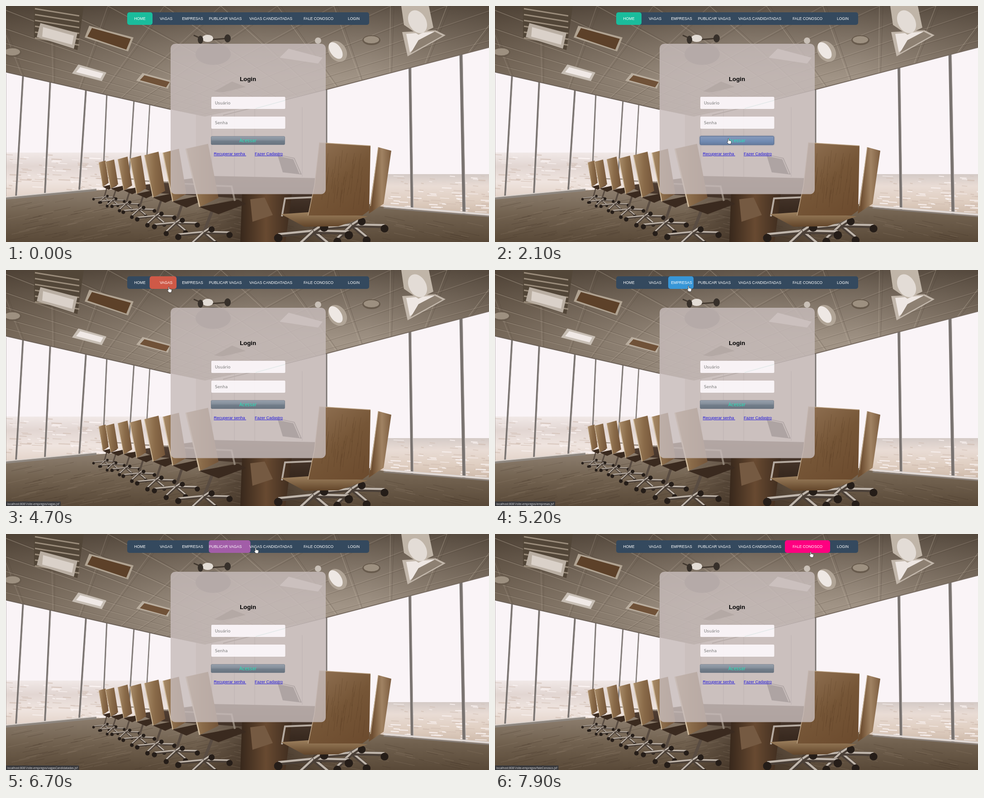
An HTML page with a canvas for the animation above (8 s loop, 1068 by 525 pixels).

```html
<!DOCTYPE html>
<html lang="pt">
<head>
<meta charset="utf-8">
<style>
  html, body { margin: 0; width: 100%; height: 100%; overflow: hidden; }
  canvas, svg { position: absolute; left: 0; top: 0; display: block; }
  text { font-family: "Liberation Sans", Arial, sans-serif; white-space: pre; }
  .nav { font-size: 8.4px; fill: #fff; text-anchor: middle; }
  .field { font: 9px "DejaVu Sans", Verdana, sans-serif; fill: #777; }
  .link { font-size: 9px; fill: #1c12dc; text-decoration: underline; }
  #status text { font: 6.35px "Open Sans", "Noto Sans", sans-serif; fill: #dfe1e5; }
</style>
</head>
<body>
<canvas id="room" width="1068" height="525"></canvas>
<svg width="1068" height="525">
  <defs>
    <linearGradient id="steel" x2="0" y2="1">
      <stop stop-color="#98a1ad"/><stop offset=".45" stop-color="#838d99"/>
      <stop offset=".55" stop-color="#727e8b"/><stop offset="1" stop-color="#69737f"/>
    </linearGradient>
    <linearGradient id="blue" x2="0" y2="1">
      <stop stop-color="#8799bb"/><stop offset=".6" stop-color="#718bb2"/><stop offset="1" stop-color="#657b9e"/>
    </linearGradient>
    <filter id="glow" x="-10%" y="-50%" width="120%" height="200%">
      <feDropShadow dx="0" dy="0" stdDeviation="1.5" flood-color="#405b85"/>
    </filter>
  </defs>
  <rect x="268" y="14" width="535" height="28" rx="5" fill="#34495e"/>
  <rect id="pill" y="14" height="28" rx="5"/>
  <g id="nav"></g>

  <rect x="364" y="84" width="343" height="334.5" rx="10" fill="#c7bcbb" fill-opacity=".82"/>
  <text x="535" y="167" font-size="13.3" font-weight="bold" text-anchor="middle">Login</text>
  <g fill="#fbf6f9" fill-opacity=".95">
    <rect x="454" y="202" width="163.500" height="27" rx="2"/>
    <rect x="454" y="246" width="163.500" height="27" rx="2"/>
  </g>
  <path d="M552 228L617 210" stroke="#cfe0dd" stroke-width=".8"/>
  <text class="field" x="462" y="219">Usuário</text>
  <text class="field" x="462" y="263">Senha</text>
  <rect x="453.500" y="290" width="163" height="18.500" rx="2" fill="url(#steel)" stroke="#687482" stroke-width=".7"/>
  <rect id="hot" x="453.500" y="290" width="163" height="18.500" rx="2" fill="url(#blue)" stroke="#526c94" stroke-width=".7" filter="url(#glow)"/>
  <text x="535" y="303" text-anchor="middle" style="font:9.700px 'DejaVu Sans',Verdana,sans-serif" fill="#25e6ba">Acessar</text>
  <text class="link" x="459.500" y="332">Recuperar senha </text>
  <text class="link" x="550" y="332">Fazer Cadastro</text>

  <g id="status">
    <rect y="515" height="10" fill="#37383c" fill-opacity=".94"/>
    <text x="3" y="522.700"></text>
  </g>
  <g id="cursor" stroke-linejoin="round">
    <path id="arrow" d="M0 0V9.500L2.200 7.500L3.700 11L5.200 10.300L3.700 7H6.700Z" fill="#fff" stroke="#222" stroke-width=".7"/>
    <path id="hand" d="M-1 1Q0 -.6 1 1V5L5.500 6Q6.800 6.400 6.600 8L5.600 13H.3L-3 8.500Q-3 6.600 -1 8Z" fill="#fff" stroke="#222" stroke-width=".7"/>
  </g>
</svg>
<script>
const $ = id => document.getElementById(id);
const g = $('room').getContext('2d');

// ---- Room backdrop ----
let seed = 7;
const rnd = () => (seed = seed * 16807 % 2147483647) / 2147483647;

function path(pts) {
  g.beginPath();
  for (let i = 0; i < pts.length; i += 2) g.lineTo(pts[i], pts[i + 1]);
}
function poly(fill, ...pts) { path(pts); g.fillStyle = fill; g.fill(); }
function line(color, width, ...pts) {
  path(pts);
  g.strokeStyle = color; g.lineWidth = width; g.stroke();
}
function dot(fill, x, y, rx, ry = rx, turn = 0) {
  g.beginPath(); g.ellipse(x, y, rx, ry, turn, 0, 7);
  g.fillStyle = fill; g.fill();
}
function fade(x0, y0, x1, y1, ...colors) {
  const f = g.createLinearGradient(x0, y0, x1, y1);
  colors.forEach((c, i) => f.addColorStop(i / (colors.length - 1), c));
  return f;
}

function outside() {
  g.fillStyle = '#faf4f7'; g.fillRect(0, 0, 1068, 525);
  g.fillStyle = fade(0, 322, 0, 425, '#f3ebea', '#e2d6d2', '#efe4df', '#e3d3c9');
  g.fillRect(0, 326, 364, 104);
  g.fillStyle = fade(0, 368, 0, 465, '#cfc6c3', '#e9dcd5', '#e0cfc2', '#cdb9a9');
  g.fillRect(820, 374, 248, 94);
  for (let i = 0; i < 170; i++) {
    const right = i % 2, x = right ? 845 + rnd() * 223 : rnd() * 230;
    const y = right ? 378 + rnd() * 80 : 330 + rnd() * 82, w = 5 + rnd() * 22;
    line(rnd() < .5 ? '#cfbbaf99' : '#faf3f1cc', 1 + rnd() * 2, x, y, x + w, y + 1);
  }
  poly('#dcd3d0', 420, 240, 708, 185, 708, 385, 420, 385);
  for (const x of [455, 505, 550, 655]) line('#b9aeaa', 2, x, 225, x, 380);
}

function floor() {
  poly(fade(0, 405, 0, 525, '#8e7f70', '#71614f', '#594938'),
    0, 430, 200, 410, 400, 398, 700, 420, 840, 448, 1068, 468, 1068, 525, 0, 525);
  poly(fade(420, 0, 720, 0, '#3b2c2000', '#34261cbb', '#3b2c2000'), 380, 420, 800, 430, 840, 525, 330, 525);
  for (let i = 0; i < 260; i++) {
    const x = rnd() * 1068, y = 435 + rnd() * 90, d = 15 + rnd() * 35;
    if (x > 800 && y < 475) continue;
    line(i % 2 ? '#a0907e44' : '#3f322655', 1, x, y, x + (x < 500 ? d : -d), y - d * .22);
  }
  line('#8e8780', 5, 0, 428, 200, 409);
  line('#dcd4cf', 2, 0, 425, 200, 406);
  line('#e0d9d6', 4, 835, 445, 1068, 464);
  line('#877e77', 3, 835, 449, 1068, 468);
}

function mullions() {
  const posts = [[38, 150, 22, 428, 4], [98, 165, 86, 420, 4], [177, 185, 162, 412, 4], [223, 195, 214, 400, 3],
    [283, 210, 273, 370, 3], [318, 218, 311, 345, 2.5], [893, 130, 898, 456, 6], [1006, 100, 1013, 466, 7], [709, 180, 709, 310, 3]];
  for (const [x0, y0, x1, y1, w] of posts) {
    line('#797370', w, x0, y0, x1, y1);
    line('#c9c2c0', 1, x0 + w / 2, y0, x1 + w / 2, y1);
  }
  line('#8d8784', 1, 0, 150, 0, 430);
}

function ceiling() {
  g.save();
  path([0, 0, 1068, 0, 1068, 92, 708, 186, 440, 246, 364, 230, 0, 147]);
  g.clip();
  g.fillStyle = fade(0, 0, 1068, 0, '#77695a', '#8b7e70', '#a49789', '#a09385', '#85786a');
  g.fillRect(0, 0, 1068, 250);
  g.fillStyle = fade(0, 0, 0, 160, '#32271d99', '#4d403300');
  g.fillRect(0, 0, 1068, 250);
  // two-point perspective tile grid
  for (let x = -1900; x < 3000; x += 125) {
    line('#c5b9a866', 1.2, 846, 340, x, 0);
    line('#4f433766', 1, 846, 340, x + 8, 0);
    line('#c5b9a844', 1.2, 107, 340, x, 0);
    line('#4f433755', 1, 107, 340, x + 8, 0);
  }
  poly('#524638', 62, 0, 172, 0, 158, 98, 62, 70);
  for (let i = 0; i < 6; i++) line('#9a8c7b', 3, 64, 6 + i * 13, 162, 22 + i * 13);
  poly('#b9aea2', 76, 38, 158, 60, 150, 95, 68, 69);
  poly('#dad1c9', 82, 47, 150, 66, 146, 86, 80, 68);
  poly('#b0a392', 184, 44, 282, 70, 270, 101, 174, 70);
  poly('#5d4129', 190, 49, 276, 73, 266, 97, 180, 68);
  poly('#c7beb4', 160, 130, 222, 148, 212, 167, 146, 150);
  poly('#f0e9e6', 164, 136, 215, 150, 209, 161, 155, 147);
  poly('#baae9f', 302, 149, 364, 166, 358, 184, 288, 166);
  poly('#705238', 306, 154, 362, 169, 354, 181, 296, 165);
  poly('#c2b7ab', 876, 58, 950, 54, 972, 65, 888, 112);
  poly('#eee7e3', 885, 62, 948, 57, 893, 103);
  poly('#8d8072', 912, 76, 948, 57, 965, 66, 895, 105);
  poly('#c0b5a8', 874, 0, 935, 0, 945, 48, 912, 64, 880, 42);
  dot('#e3dcd6', 910, 35, 19, 27, -.5);
  dot('#b0a496', 733, 101, 19, 25, -.6);
  dot('#eee8e4', 729, 99, 12, 21, -.6);
  for (const [x, y] of [[808, 76], [14, 103]]) {
    dot('#685b4d', x, y, 20, 11); dot('#9d9080', x, y - 1, 17, 8);
  }
  line('#42382f', 3, 415, 65, 440, 76, 490, 72);
  dot('#e3dcd5', 446, 72, 12, 8);
  dot('#37302a', 430, 75, 6, 9); dot('#37302a', 490, 72, 7, 9);
  dot('#625b56', 458, 107, 39, 24);
  dot('#c9c0b7', 690, 77, 7, 7);
  poly('#ded6d0', 605, 115, 625, 95, 700, 115, 690, 128);
  poly('#5e5145', 460, 190, 500, 168, 530, 180, 480, 192);
  g.restore();
  line('#6d6259', 2, 0, 147, 364, 230);
  line('#766a60', 2, 1068, 92, 708, 186, 480, 243);
}

function base(x, y, r) {
  for (const [dx, dy] of [[-1, .1], [-.45, .42], [.45, .38], [1, .02], [.3, -.2]]) {
    line('#4b4038', r * .13, x, y, x + dx * r, y + dy * r);
    line('#c0b6ac', r * .06, x, y - r * .03, x + dx * r, y + dy * r - r * .03);
    dot('#251d18', x + dx * r, y + dy * r + r * .08, r * .12);
  }
}

function chair(x, y, w, h) {
  const cx = x + w * .55, cy = y + h * 1.42;
  line('#594c42', h * .05, cx + w * .3, y + h, cx, cy);
  base(cx, cy, h * .42);
  poly('#3a2a1f', x + w * .4, y + h, x + w * 1.6, y + h * .88, x + w * 1.85, y + h * .95, x + w, y + h * 1.12);
  line('#8f8275', h * .03, x + w * .9, y + h * .65, x + w * 1.4, y + h * .66, x + w * 1.5, y + h * .9);
  poly(fade(x, 0, x + w, 0, '#aa8d6a', '#8a6b49', '#735439'),
    x, y + h * .04, x + w * .68, y - h * .04, x + w, y + h * .85, x + w * .42, y + h);
  line('#d1bda0', Math.max(1, w * .04), x, y + h * .04, x + w * .42, y + h);
}

function furniture() {
  poly(fade(0, 375, 0, 455, '#574438', '#38291f'), 290, 400, 450, 378, 692, 383, 692, 462, 620, 466, 545, 430, 460, 424, 330, 416);
  poly(fade(518, 0, 632, 0, '#37271b', '#684a31', '#3d2b1e'), 522, 418, 632, 418, 618, 525, 518, 525);
  poly('#755a42', 540, 430, 572, 426, 590, 465, 545, 480);
  poly('#3f3935', 600, 330, 638, 338, 654, 375, 612, 370);
  line('#d8d0cb', 2, 603, 333, 636, 340, 650, 373);
  const row = [[205, 346, 22, 56], [220, 344, 28, 62], [247, 338, 32, 72], [274, 336, 36, 82],
    [306, 328, 46, 98], [347, 322, 52, 113], [398, 312, 72, 135]];
  for (const c of row) chair(...c);

  line('#63564a', 6, 775, 460, 775, 490);
  base(765, 488, 72);
  poly(fade(810, 0, 852, 0, '#6e4e31', '#a18363', '#7c5d40'), 823, 314, 852, 322, 835, 440, 802, 462);
  line('#c9b69c', 1.5, 823, 314, 806, 445);
  line('#4e4035', 8, 690, 480, 678, 505);
  base(680, 502, 78);
  line('#b5aaa0', 4, 690, 425, 617, 428, 610, 468);
  poly(fade(0, 455, 0, 492, '#a38764', '#604328'), 608, 463, 680, 458, 800, 468, 735, 490, 660, 491);
  poly(fade(685, 304, 800, 460, '#907153', '#765637', '#6c4b2e'), 693, 304, 806, 311, 803, 455, 788, 466, 668, 466, 682, 400);
  line('#bca487', 1.5, 668, 466, 682, 400, 693, 304, 806, 311);
  for (let i = 0; i < 45; i++) {
    const x = 700 + rnd() * 95, y = 320 + rnd() * 95;
    line('#51351f44', 1, x, y, x - 4, y + 15 + rnd() * 28);
  }
}
[outside, mullions, floor, ceiling, furniture].forEach(draw => draw());

// ---- Menu: label, left, width, colour ----
const items = [
  ['HOME', 268, 56, 26, 188, 156],
  ['VAGAS', 324, 60, 231, 76, 60],
  ['EMPRESAS', 384.5, 56, 52, 152, 219],
  ['PUBLICAR VAGAS', 440, 90, 155, 89, 182],
  ['VAGAS CANDIDATADAS', 530, 111, 230, 126, 34],
  ['FALE CONOSCO', 641, 100, 255, 0, 128],
  ['LOGIN', 741, 56]
];
$('nav').innerHTML = items.map(([label, x, w]) =>
  `<text class="nav" x="${x + w / 2}" y="30.700">${label}</text>`).join('');

const hovers = [[4400, 1], [4800, 2], [5750, 3], [6650, 4], [7320, 5]];
const pages = [[0, ''], [2900, 'recuperarSenha'], [4000, ''], [4400, 'vagas'], [4900, 'empresas'],
  [5800, 'publicarVagas'], [6600, 'vagasCandidatadas'], [7300, 'faleConosco']];
const route = [[300, 20, 10], [1000, 244, 179], [1300, 244, 179], [1900, 516, 294], [2200, 516, 294],
  [2700, 498, 318], [2900, 527, 326], [3300, 385, 113], [3900, 385, 113], [4200, 371, 47], [4300, 371, 47],
  [4400, 365, 40], [4700, 360, 37], [5200, 428, 35], [5300, 428, 35], [5700, 420, 30], [6200, 484, 31],
  [6400, 484, 31], [6700, 552, 30], [6900, 585, 34], [7100, 585, 34], [7900, 698, 39]];

const clamp = v => Math.max(0, Math.min(1, v));
const mix = (a, b, k) => a + (b - a) * k;

// CSS "ease": cubic-bezier(.25, .1, .25, 1)
function ease(x) {
  let lo = 0, hi = 1, u;
  for (let i = 0; i < 20; i++) {
    u = (lo + hi) / 2;
    if (.75 * u * (1 - u) + u ** 3 < x) lo = u; else hi = u;
  }
  return .3 * u * (1 - u) ** 2 + 3 * u * u * (1 - u) + u ** 3;
}

function drawPill(t) {
  let state = items[0].slice(1);
  hovers.forEach(([start, n], i) => {
    if (t < start) return;
    const end = Math.min(t, (hovers[i + 1] || [8000])[0]);
    const k = ease(clamp((end - start) / 500));
    state = state.map((v, j) => mix(v, items[n][j + 1], k));
  });
  const [x, w, ...rgb] = state;
  $('pill').setAttribute('x', x);
  $('pill').setAttribute('width', w);
  $('pill').setAttribute('fill', `rgb(${rgb.map(Math.round)})`);
}

function drawStatus(t) {
  const page = pages.findLast(p => p[0] <= t)[1];
  const [box, text] = $('status').children;
  $('status').style.display = page ? '' : 'none';
  if (!page) return;
  text.textContent = `localhost:8081/site-empregos/${page}.jsf`;
  text.style.opacity = t >= 3200 && t < 4000 ? .55 : 1;
  box.setAttribute('width', text.getComputedTextLength() + 6);
}

function drawCursor(t) {
  $('cursor').style.display = t < 300 ? 'none' : '';
  const next = route.findIndex(p => p[0] > t);
  const b = route.at(next), a = next > 0 ? route[next - 1] : b;
  const k = a === b ? 0 : (t - a[0]) / (b[0] - a[0]);
  $('cursor').setAttribute('transform', `translate(${mix(a[1], b[1], k)} ${mix(a[2], b[2], k)})`);
  const hand = t >= 1900 && t < 2500 || t >= 2900 && t < 3100 || t >= 4400;
  $('hand').style.display = hand ? '' : 'none';
  $('arrow').style.display = hand ? 'none' : '';
}

const begin = performance.now();
function frame() {
  const t = Math.floor((performance.now() - begin) % 8000 / 100) * 100;
  drawPill(t);
  drawStatus(t);
  drawCursor(t);
  $('hot').style.opacity = clamp((t - 1850) / 250) * clamp((2700 - t) / 300);
  requestAnimationFrame(frame);
}
frame();
</script>
</body>
</html>
```
